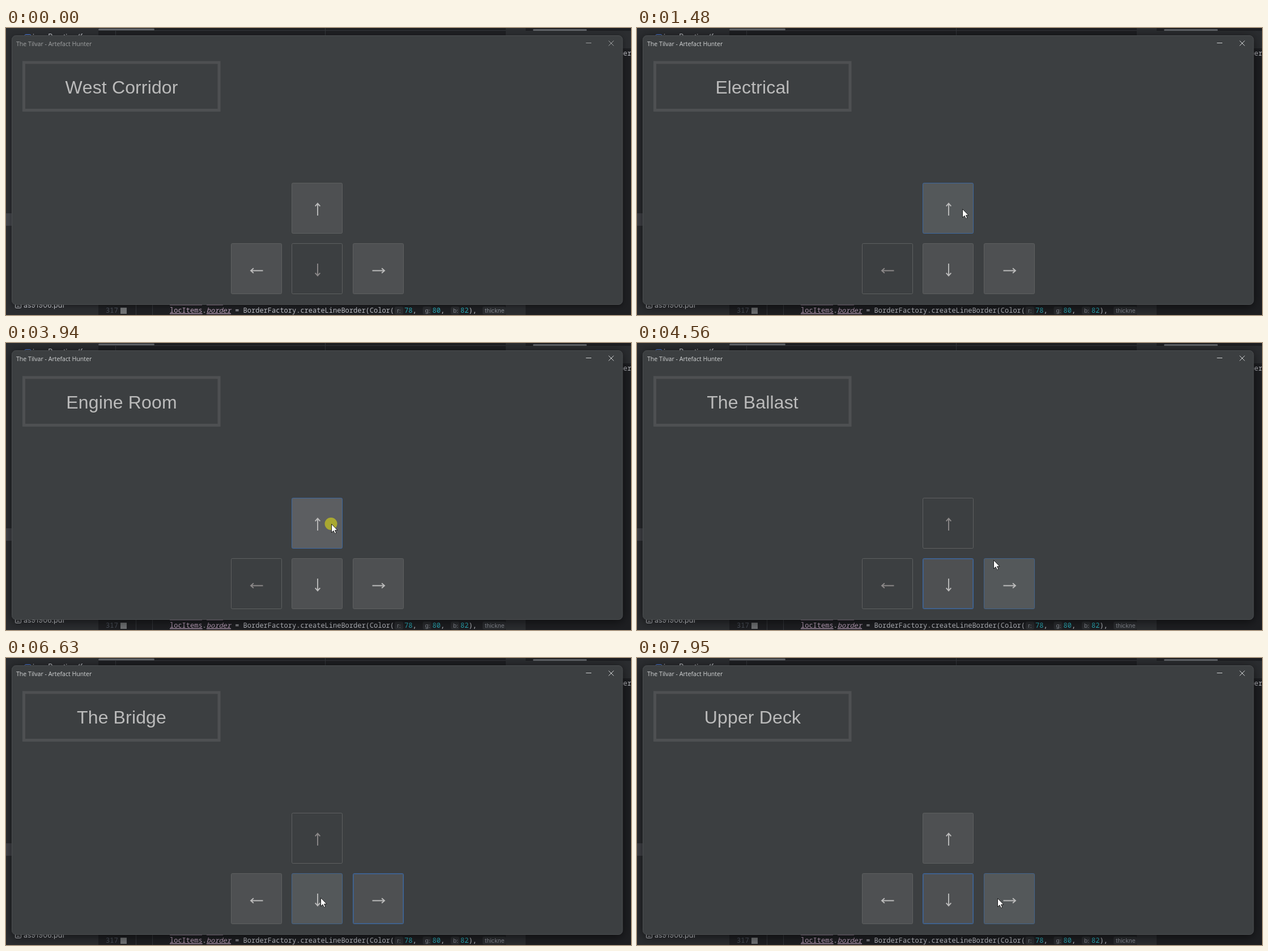
These frames come from a looping animation (1103x508 px, 8 s). An HTML page:

```html
<!DOCTYPE html>
<html lang="en">
<head>
<meta charset="utf-8">
<title>Room navigator</title>
<style>
  html, body { margin: 0; width: 100%; height: 100%; overflow: hidden; background: #1e1f22; }
  svg { display: block; }
  text { white-space: pre; }
  .code { font: 12px "Noto Sans Mono", monospace; fill: #bcbec4; }
  .hint { font: 10px Inter, sans-serif; fill: #868a91; }
  .file { font: 12.5px Inter, sans-serif; fill: #ced0d6; }
  .prop { fill: #bda2bc; text-decoration: underline; }
  .num { fill: #2aacb8; }
  .frame { fill: #3c3f41; stroke: #4b4e50; }
  .room { font: 32px "Liberation Sans", Arial, sans-serif; font-kerning: none; letter-spacing: .14px; fill: #bbb; text-anchor: middle; }
  .chrome { color: #a0a2a3; }
  .active .chrome { color: #d2d4d5; }
  .shadow { filter: drop-shadow(0 2px 4px #0006); }
  .active .shadow { filter: drop-shadow(0 3px 9px #0009); }

  .face { fill: #4e5052; stroke: #5e6060; }
  .ring { fill: none; stroke: none; }
  .arrow { fill: none; stroke: #bbb; stroke-width: 1.9; }
  .off .face { fill: #3c3f41; }
  .off .arrow { stroke: #8b8888; }
  .hover .face { fill: #54585a; stroke: #43658d; }
  .pressed .face { fill: #5c5e61; }
  .focus .face { stroke: #3d679f; }
  .focus:not(.hover) .ring { stroke: #3d679f; stroke-opacity: .55; }
</style>
</head>
<body>
<svg id="stage" width="1103" height="508">
  <!-- code editor behind the window -->
  <rect width="1103" height="508" fill="#1e1f22"/>
  <path d="M0 0H163V508H0ZM882 0H917V508H882ZM917 5H1103V36H917Z" fill="#2b2d30"/>
  <path d="M0 328H11V350H0Z" fill="#43454a"/>
  <path d="M163 4.5H882M193.5 5V13M563.5 0V13M229.5 489V508M258.5 489V508" stroke="#34373b" fill="none"/>
  <rect x="163" y="1" width="99" height="3" rx="1.5" fill="#606368"/>
  <rect x="930" y="2" width="95" height="3" rx="1.5" fill="#606368"/>
  <rect x="33.5" y="11.5" width="10" height="10" rx="1" fill="none" stroke="#548af7"/>
  <text class="file" x="47" y="20">java Practice (f</text>
  <rect x="16.5" y="485.5" width="10" height="10" rx="1" fill="none" stroke="#ced0d6"/>
  <path d="M19 492.5H24" stroke="#ced0d6"/>
  <text class="file" x="31" y="495">as91906.pdf</text>
  <text class="code" x="1082" y="49">per</text>
  <path d="M289 490.5H346M354 490.5H383" stroke="#806a80"/>
  <text class="code" x="176" y="504" style="fill:#4b5059">317</text>
  <rect x="202" y="495" width="11" height="11" fill="#707274"/>
  <text class="code" x="289" y="504"><tspan class="prop">locItems</tspan>.<tspan class="prop" font-style="italic">border</tspan> = BorderFactory.createLineBorder(Color(</text>
  <g id="hints"></g>

  <!-- game window -->
  <rect class="frame shadow" x="10.5" y="13.5" width="1077.5" height="476" rx="7"/>
  <g class="chrome">
    <text x="18" y="31.5" fill="currentColor" style="font:10.6px 'Open Sans',sans-serif">The Tilvar - Artefact Hunter</text>
    <path d="M1023.5 26.5H1033M1063.5 22.5L1072.5 31.5M1072.5 22.5L1063.5 31.5" stroke="currentColor"/>
  </g>
  <rect x="31.5" y="61" width="344.5" height="84.5" fill="none" stroke="#4e5052" stroke-width="5"/>
  <text class="room" id="room" x="204" y="116"></text>
  <g id="buttons"></g>
  <circle id="click" r="11" fill="#a9a831"/>
  <path id="cursor" d="M.5 .5V15.5L4 12.3L6.4 17.4L8.8 16.4L6.5 11.4H11Z" fill="#fff" stroke="#111" stroke-width=".9"/>
</svg>
<script>
const LOOP = 8000, SIZE = 90, PITCH = 107.5;
const $ = id => document.getElementById(id);

const button = (col, row, angle) => ({
  x: Math.round(504 + PITCH * col), y: Math.round(273.5 + PITCH * row), angle
});
const buttons = { U: button(0, 0, 0), L: button(-1, 1, -90), D: button(0, 1, 180), R: button(1, 1, 90) };

// Clicking `via` leads into the room once the button is released.
const rooms = [
  { via: '', click: 0, enter: 0, name: 'West Corridor', exits: 'ULR' },
  { via: 'U', click: 1410, enter: 1480, name: 'Electrical', exits: 'UDR' },
  { via: 'U', click: 2470, enter: 2530, name: 'Engine Room', exits: 'UDR' },
  { via: 'U', click: 3940, enter: 4010, name: 'The Ballast', exits: 'DR' },
  { via: 'R', click: 5700, enter: 5840, name: 'The Bridge', exits: 'LDR' },
  { via: 'D', click: 7010, enter: 7150, name: 'Upper Deck', exits: 'ULDR' }
];

// Pointer strokes: each leaves the previous end point and slows down by `power`.
const APPEAR = 70, ORIGIN = [1024, 472];
const strokes = [
  { start: 210, end: 340, steps: 3, power: 1, to: [753, 338] },
  { start: 630, end: 1150, steps: 8, power: 4, to: [574, 320], bend: [626, 278] },
  { start: 4350, end: 4900, steps: 9, power: 2, to: [653, 412] },
  { start: 6490, end: 6760, steps: 4, power: 4, to: [548, 425] },
  { start: 7870, end: 7950, steps: 2, power: 1, to: [636, 425] }
];

function pointerAt(t) {
  if (t < APPEAR) return [-50, -50];
  let from = ORIGIN;
  for (const { start, end, steps, power, to, bend = to } of strokes) {
    if (t < start) break;
    const step = Math.min(steps, 1 + Math.floor((t - start) / (end - start) * (steps - 1)));
    const s = 1 - (1 - step / steps) ** power;
    const r = 1 - s;
    from = bend === to
      ? from.map((v, i) => r * v + s * to[i])
      : from.map((v, i) => r * r * v + 2 * r * s * bend[i] + s * s * to[i]);
  }
  return from.map(Math.round);
}

const move = (node, x, y) => node.setAttribute('transform', `translate(${x} ${y})`);

const pill = (x, width, label) =>
  `<rect x="${x}" y="493" width="${width}" height="14" rx="3" fill="#2b2d30"/>
   <text class="hint" x="${x + 4}" y="503.5">${label}</text>`;
const argument = (label, i) => {
  const x = 686 + 49.5 * i;
  return pill(x, 15, label + ':') +
    `<text class="code" x="${x + 17}" y="504"><tspan class="num">${78 + 2 * i}</tspan>${i === 2 ? '),' : ','}</text>`;
};
$('hints').innerHTML = [...'rgb'].map(argument).join('') + pill(841, 41, 'thickne');

$('buttons').innerHTML = Object.entries(buttons).map(([key, { x, y, angle }]) => {
  const center = angle % 180 ? '45.5 48.5' : '46 47';
  return `<g id="${key}" transform="translate(${x} ${y})">
    <rect class="face" x=".5" y=".5" width="89" height="89" rx="2"/>
    <rect class="ring" x="1.5" y="1.5" width="87" height="87" rx="1"/>
    <path class="arrow" transform="translate(${center}) rotate(${angle})"
      d="M0 11V-10.5M-4.3 -5.6L0 -10.5L4.3 -5.6"/>
  </g>`;
}).join('');

function draw(t) {
  const clicked = rooms.findLast(r => r.click <= t);
  const room = rooms.findLast(r => r.enter <= t);
  const pressed = clicked !== room;
  const { via } = clicked;
  const focused = pressed || room.exits.includes(via) ? via : room.exits[0];
  const [x, y] = pointerAt(t);

  $('stage').setAttribute('class', via ? 'active' : '');
  $('room').textContent = room.name;
  for (const [key, b] of Object.entries(buttons)) {
    const on = room.exits.includes(key);
    const hover = on && x >= b.x && x < b.x + SIZE && y >= b.y && y < b.y + SIZE;
    const { classList } = $(key);
    classList.toggle('off', !on);
    classList.toggle('hover', hover);
    classList.toggle('pressed', hover && pressed);
    classList.toggle('focus', key === focused);
  }
  $('click').setAttribute('visibility', pressed ? 'visible' : 'hidden');
  move($('click'), x - .5, y);
  move($('cursor'), x, y);
}

const start = performance.now();
function tick() {
  draw((performance.now() - start) % LOOP);
  requestAnimationFrame(tick);
}
tick();
</script>
</body>
</html>
```
